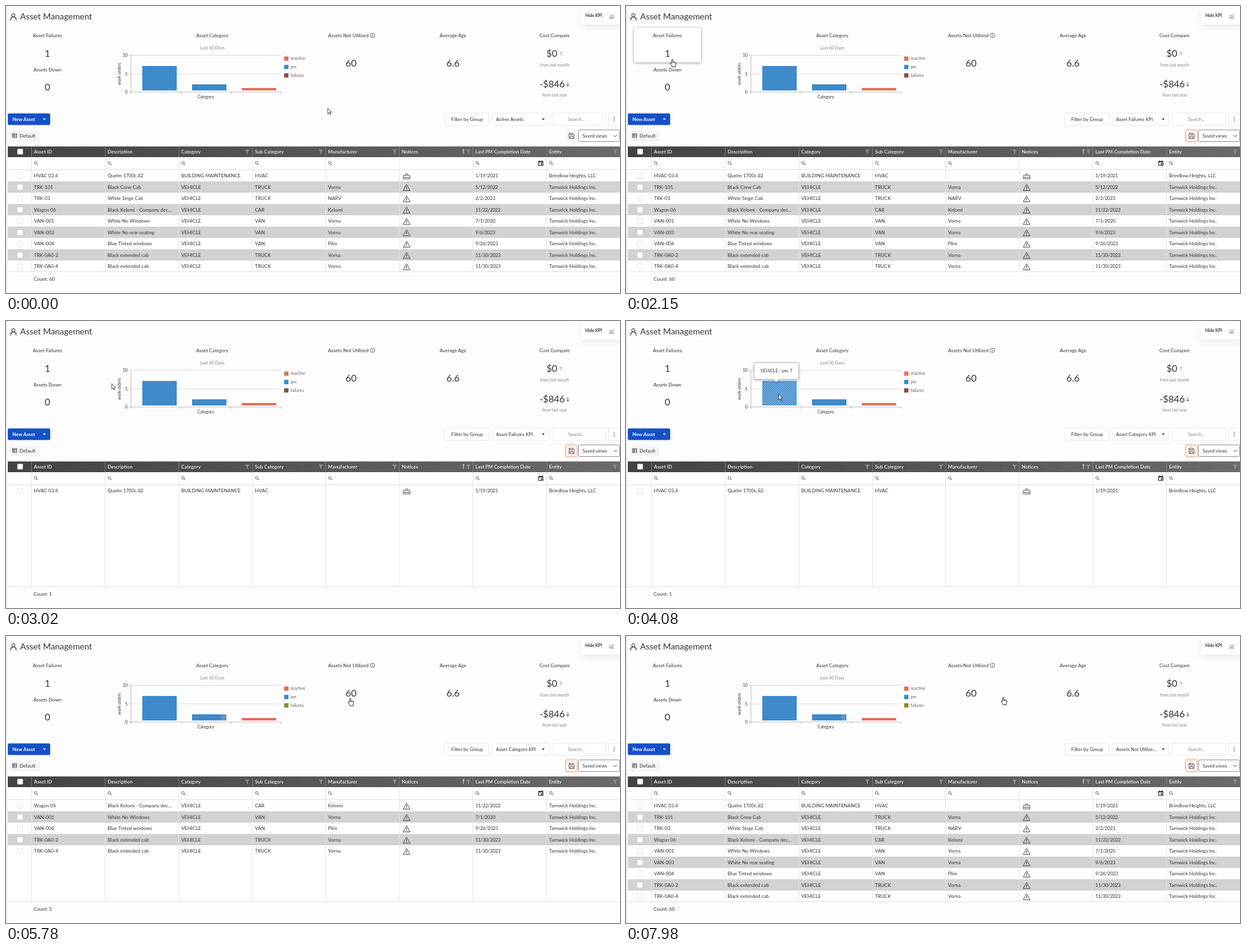
An HTML page that plays this animation: 1000 by 469 pixels, repeating every 8 s.

```html
<!DOCTYPE html>
<html lang="en">
<head>
<meta charset="utf-8">
<title>Asset Management</title>
<style>
html, body { margin: 0; width: 100%; height: 100%; overflow: hidden; background: #fdfdfd; }
svg { display: block; width: 100%; height: 100%; font-family: Lato, sans-serif; }
text { white-space: pre; }
</style>
</head>
<body>
<svg id="stage" viewBox="0 0 1000 469">
  <defs>
    <linearGradient id="head"><stop stop-color="#424242"/><stop offset="1" stop-color="#6a6a6a"/></linearGradient>
    <linearGradient id="edge"><stop stop-color="#ececec"/><stop offset="1" stop-color="#fdfdfd"/></linearGradient>
    <pattern id="hatch" width="2.8" height="2.8" patternUnits="userSpaceOnUse" patternTransform="rotate(45)">
      <rect width="2.8" height="2.8" fill="#438dcc"/><rect width="1.3" height="2.8" fill="#7db1dd"/>
    </pattern>
    <filter id="shadow" x="-20%" y="-30%" width="140%" height="170%">
      <feDropShadow dx="0" dy="1" stdDeviation="2" flood-opacity=".4"/>
    </filter>
    <filter id="soft" x="-30%" y="-50%" width="160%" height="220%">
      <feDropShadow dx="0" dy="4" stdDeviation="6" flood-opacity=".07"/>
    </filter>
    <filter id="glow" x="-50%" y="-50%" width="200%" height="200%">
      <feDropShadow dx="0" dy="0" stdDeviation="1.8" flood-color="#ee8a50" flood-opacity=".75"/>
    </filter>
  </defs>
</svg>
<script>
const stage = document.getElementById('stage');
const INK = '#333', GRAY = '#808890', BLUE = '#3e8acb';

// Markup helpers; text is placed by its vertical centre.
const text = (x, cy, s, size = 7.9, extra = '') =>
  `<text x="${x}" y="${cy + size * .35}" font-size="${size}" fill="${INK}" ${extra}>${s}</text>`;
const mid = (x, cy, s, size, extra = '') => text(x, cy, s, size, 'text-anchor="middle" ' + extra);
const rect = (x, y, w, h, fill, extra = '') =>
  `<rect x="${x}" y="${y}" width="${w}" height="${h}" fill="${fill}" ${extra}/>`;
const path = (d, stroke = INK, width = .9, fill = 'none', extra = '') =>
  `<path d="${d}" stroke="${stroke}" stroke-width="${width}" fill="${fill}" ${extra}/>`;
const at = (x, y, s) => `<g transform="translate(${x} ${y})">${s}</g>`;
const tint = color => `style="fill:${color}"`;
const box = (x, y, w, h, stroke = '#e4e4e4') => rect(x, y, w, h, '#fff', `rx="2" stroke="${stroke}" stroke-width=".8"`);
const caret = (x, y, fill = INK) => path(`M${x - 2.4} ${y - 1.2}h4.8l-2.4 2.6z`, 'none', 0, fill);
const layer = (s = '') => {
  const g = document.createElementNS('http://www.w3.org/2000/svg', 'g');
  g.innerHTML = s;
  stage.append(g);
  return g;
};

const columnX = [41, 161, 281, 401, 520, 640, 760, 880];
const headings = ['Asset ID', 'Description', 'Category', 'Sub Category', 'Manufacturer', 'Notices', 'Last PM Completion Date', 'Entity'];
const OWNER = 'Tarnwick Holdings Inc.';
const assets = [
  ['HVAC 03.4', 'Quelm 1700c.82', 'BUILDING MAINTENANCE', 'HVAC', '', 'box', '1/19/2021', 'Brindlow Heights, LLC'],
  ...[
    ['TRK-101', 'Black Crew Cab', 'TRUCK', 'Vorna', '5/12/2022'],
    ['TRK-03', 'White Singe Cab', 'TRUCK', 'NARV', '2/2/2023'],
    ['Wagon 06', 'Black Kelomi - Company dec...', 'CAR', 'Kelomi', '11/22/2022'],
    ['VAN-001', 'White No Windows', 'VAN', 'Vorna', '7/1/2020'],
    ['VAN-003', 'White No rear seating', 'VAN', 'Vorna', '9/6/2023'],
    ['VAN-004', 'Blue Tinted windows', 'VAN', 'Plim', '9/26/2023'],
    ['TRK-0A0-2', 'Black extended cab', 'TRUCK', 'Vorna', '11/30/2023'],
    ['TRK-0A0-4', 'Black extended cab', 'TRUCK', 'Vorna', '11/30/2023']
  ].map(([id, about, kind, maker, date]) => [id, about, 'VEHICLE', kind, maker, 'warn', date, OWNER])
];

const notices = {
  warn: path('M0-5.2L5.6 4.8H-5.6Z', INK, .9, 'none', 'stroke-linejoin="round"') + path('M0-1.8V1.8M0 2.8V3.7', INK, 1),
  box: path('M-5.5-1.5h11v6h-11zM-2.5-1.5l1-2.5h3l1 2.5M-5.5 2h11M-2.5 1v2M2.5 1v2', INK, .75, 'none', 'stroke-linejoin="round"')
};
const funnel = path('M-4-3.5H4L1 0V4L-1 3V0Z', 'none', 0, '#8d8d8d');
const lens = '<circle cx="-.8" cy="-.8" r="2.1" fill="none" stroke="#444" stroke-width=".8"/>' + path('M.8.8L3 3', '#444', 1);
const upArrow = color => path('M0 3.5V-3M-2.6-.6L0-3.2L2.6-.6', color, .8);

function header() {
  return rect(0, 0, 4, 469, 'url(#edge)')
    + at(12, 18, '<circle cy="-3" r="2.6" fill="none" stroke="#333"/>'
      + path('M-1.6-1L-5 6M1.6-1L5 6M-6 3C-3-1 3-1 6 3', INK, 1))
    + text(23, 17, 'Asset Management', 13.9)
    + rect(937, 1, 70, 29, '#fff', 'filter="url(#soft)"')
    + text(943.5, 16, 'Hide KPI', 6.9, 'font-weight="700"')
    + path('M982.5 17l2.5-2 2 1 3.5-3M982.5 19.3l2.5-1.5 2 .7 3.5-2M982.5 20h8', '#555', .7);
}

function kpis() {
  return mid(67.5, 104, 'Assets Down') + mid(67.5, 133, '0', 15.5)
    + text(524.5, 48, 'Assets Not Utilized')
    + '<circle cx="597" cy="48" r="3.6" fill="none" stroke="#333" stroke-width=".7"/>' + path('M597 47.3v2.7M597 45.7v.8', INK, .8)
    + mid(562, 94, '60', 15.5) + mid(728, 48, 'Average Age') + mid(728, 94, '6.6', 15.5)
    + mid(893.5, 48, 'Cost Compare')
    + mid(889, 78, '$0', 15.3) + at(904, 78, upArrow('#b98a68')) + mid(893.5, 96.5, 'from last month', 6.8, tint(GRAY))
    + mid(889.5, 128, '-$846', 15.3) + at(915, 128, `<g transform="scale(1 -1)">${upArrow(INK)}</g>`)
    + mid(893.5, 145.5, 'from last year', 6.8, tint(GRAY));
}

function chart() {
  const ticks = [[10, 80.5], [5, 111], [0, 140.5]].map(([n, y]) =>
    text(198, y + .5, n, 6.8, 'text-anchor="end"') + path(`M200 ${y}H448`, n ? '#d0d0d0' : '#b4b4b4', .8)).join('');
  return mid(336, 48, 'Asset Category') + mid(336, 69, 'Last 60 Days', 7, tint(GRAY))
    + ticks + path('M203.5 80V144M285 140v4M366.5 140v4M448 140v4', '#b0b0b0', .8)
    + `<g transform="translate(184.5 111) rotate(-90)">${mid(0, 0, 'work orders', 6.8)}</g>`
    + mid(325.5, 149, 'Category', 6.8)
    + ['reactive', 'pm', 'failures'].map((s, i) => text(463.5, 86 + i * 13.7, s, 6.8, tint('#666'))).join('');
}

function toolbar() {
  return rect(3, 175.5, 69, 19, '#1650c8', 'rx="2"')
    + text(10.5, 185, 'New Asset', 7.8, 'font-weight="700" ' + tint('#fff')) + caret(62.5, 185, '#fff')
    + box(714.5, 175, 72, 20.5) + mid(751, 185, 'Filter by Group')
    + box(792, 175, 92, 20) + caret(875, 185)
    + box(889.5, 175, 87, 20) + mid(929, 185, 'Search...', 7.9, 'font-style="italic" ' + tint('#888'))
    + box(981.5, 175, 24, 20) + [-3, 0, 3].map(d => `<circle cx="990.5" cy="${185 + d}" r=".8" fill="#333"/>`).join('')
    + rect(6, 204, 49, 17, '#f4f4f4', 'rx="2"')
    + path('M10.5 208.5h7v6.5h-7zM10.5 210.5h7M10.5 212.7h7M13 208.5v6.5', '#444', .8)
    + text(22, 212.5, 'Default')
    + box(932.5, 202.5, 67, 19, '#777') + text(939, 212.5, 'Saved views', 7.5)
    + path('M989.5 211l2.8 2.8 2.8-2.8', INK);
}

function tableFrame() {
  return rect(3, 229.5, 997, 17.5, 'url(#head)') + rect(3, 247, 997, 187, '#fff')
    + rect(18.5, 233.5, 9, 9, '#fff', 'rx="1"')
    + path('M3 267.5H1000M3 434H1000', '#dcdcdc', .9)
    + columnX.map((x, i) =>
      path(`M${x + .5} 229.5V247`, '#858585', .8)
      + text(x + 4.5, 238, headings[i], 7.9, 'font-weight="500" ' + tint('#fff'))
      + (i === 5 ? '' : at(x + 8, 257, lens))).join('')
    + [393, 513, 633, 753, 992].map(x => at(x, 238, funnel)).join('')
    + path('M745 241.5v-7M743.5 236l1.5-1.7 1.5 1.7', '#fff', .9)
    + path('M867.5 254h7v6.5h-7zM867.5 255h7M869 252.5v2M873 252.5v2', '#222', 1.1) + rect(871, 257, 2.3, 2.3, '#222');
}

function tableRows(shown) {
  const rows = shown.map((index, r) => {
    const cy = 277.3 + r * 18.5;
    const cells = assets[index].map((value, c) => {
      if (c === 5) return at(652.5, cy + 1, notices[value]);
      return text(columnX[c] + 4.5, cy, value, 7.9, c === 6 ? 'letter-spacing="-.3"' : '');
    }).join('');
    return (r % 2 ? rect(3, cy - 9.3, 997, 18.5, '#d2d2d2') : '')
      + rect(18.5, cy - 4, 8.5, 8.5, '#fff', 'rx="1" stroke="#ddd" stroke-width=".8"') + cells;
  }).join('');
  return rows + path(columnX.map(x => `M${x + .5} 247V434`).join(''), '#e2e2e2', .9)
    + text(45, 446.5, 'Count: ' + (shown.length === 9 ? 60 : shown.length));
}

const filterControls = (label, active) => text(798, 185, label, 7.7)
  + rect(911.5, 202.5, 19, 19, active ? '#f8f1ec' : '#f4f4f4', active ? 'rx="2" stroke="#e8ae8c" stroke-width=".7" filter="url(#glow)"' : 'rx="2"')
  + path('M917 208h6.5l1.8 1.8v6.7h-8.3zM918.8 208v2.7h4.2v-2.7M918.8 216.500v-3.300h4.700v3.300', '#444', .8);

const failureCard = hover => (hover ? rect(13, 36, 109, 56, '#fff', 'filter="url(#shadow)"') : '')
  + mid(67.5, 48, 'Asset Failures') + mid(67.5, 78, '1', 15.5);

function bars(hover, visited) {
  const swatches = [visited ? '#ea6a55' : '#e0715a', BLUE, visited ? '#8c8c2c' : '#8b5040'];
  return rect(222, 98, 56, 40, hover ? 'url(#hatch)' : BLUE)
    + rect(303, 128, 56, 10, BLUE) + (visited ? rect(351, 128, 8, 10, '#6b94bb') : '')
    + rect(384, 134, 56, 4, swatches[0])
    + swatches.map((c, i) => rect(453, 82.5 + i * 13.7, 7, 7, c)).join('')
    + (hover ? path('M209 68.5H281V95H248.5L244.5 100L240.5 95H209Z', '#b5b5b5', .7, '#fff', 'filter="url(#shadow)"')
      + mid(245, 82, 'VEHICLE - pm: 7', 7) : '');
}

const arrowCursor = path('M0 0V9L2.1 7.2L3.5 10.3L5 9.6L3.6 6.6H6.3Z', '#222', .8, '#fff');
const handCursor = path('M-1 1Q0-.5 1 1V5L5 5.6Q6 6 6 7.5L5 11V13H-.5V11.5L-3.5 7.5Q-3.5 6-2 6.5L-1 7.5Z', '#222', .9, '#fff')
  + path('M1 5v2M2.8 5.4v2M4.5 5.7v2', '#222', .6);

// Cursor moves: start, end, steps, target.
const moves = [
  [590, 1210, 10, 75.5, 89.5],
  [1480, 1550, 2, 75.5, 86.5],
  [2750, 3230, 8, 243, 114],
  [3620, 3750, 2, 248.5, 119.5],
  [5030, 5780, 12, 560.5, 101],
  [5850, 6190, 5, 562, 95.5],
  [7910, 7980, 2, 614.5, 99.5]
];
function cursorAt(t) {
  let x = 524, y = 167;
  for (const [start, end, steps, toX, toY] of moves) {
    if (t < start) break;
    const p = Math.min(steps, Math.floor((t - start) / (end - start) * (steps - 1)) + 1) / steps;
    const eased = 1 - (1 - p * p) ** 3;
    x += (toX - x) * eased;
    y += (toY - y) * eased;
  }
  return { x, y };
}

const everything = assets.map((_, i) => i);
// Each view: time its label appears, time its rows appear.
const views = [
  { labelTime: 0, rowTime: 0, label: 'Active Assets', rows: everything },
  { labelTime: 2150, rowTime: 2220, label: 'Asset Failures KPI', rows: [0] },
  { labelTime: 4080, rowTime: 4150, label: 'Asset Category KPI', rows: [3, 4, 6, 7, 8] },
  { labelTime: 6590, rowTime: 6720, label: 'Assets Not Utilize...', rows: everything }
];

layer(header() + kpis() + chart() + toolbar() + tableFrame());
const layers = { rows: layer(), controls: layer(), card: layer(), bars: layer(), cursor: layer() };
const drawn = {};
function update(name, key, markup) {
  if (drawn[name] === key) return;
  drawn[name] = key;
  layers[name].innerHTML = markup();
}

function frame() {
  const t = performance.now() % 8000;
  const { x, y } = cursorAt(t);
  const onCard = x > 13 && x < 122 && y > 36 && y < 92;
  const onBar = t > 2750 && x > 222 && x < 278 && y > 98 && y < 139;
  const onUnused = x > 490 && x < 640 && y < 130;
  const visited = t > 5030 && x > 350;
  const labelled = views.findLast(v => t >= v.labelTime);
  const listed = views.findLast(v => t >= v.rowTime);

  update('rows', listed, () => tableRows(listed.rows));
  update('controls', labelled, () => filterControls(labelled.label, labelled !== views[0]));
  update('card', onCard, () => failureCard(onCard));
  update('bars', `${onBar} ${visited}`, () => bars(onBar, visited));
  update('cursor', onCard || onUnused, () => onCard || onUnused ? handCursor : arrowCursor);
  layers.cursor.setAttribute('transform', `translate(${x} ${y})`);
  requestAnimationFrame(frame);
}
frame();
</script>
</body>
</html>
```
